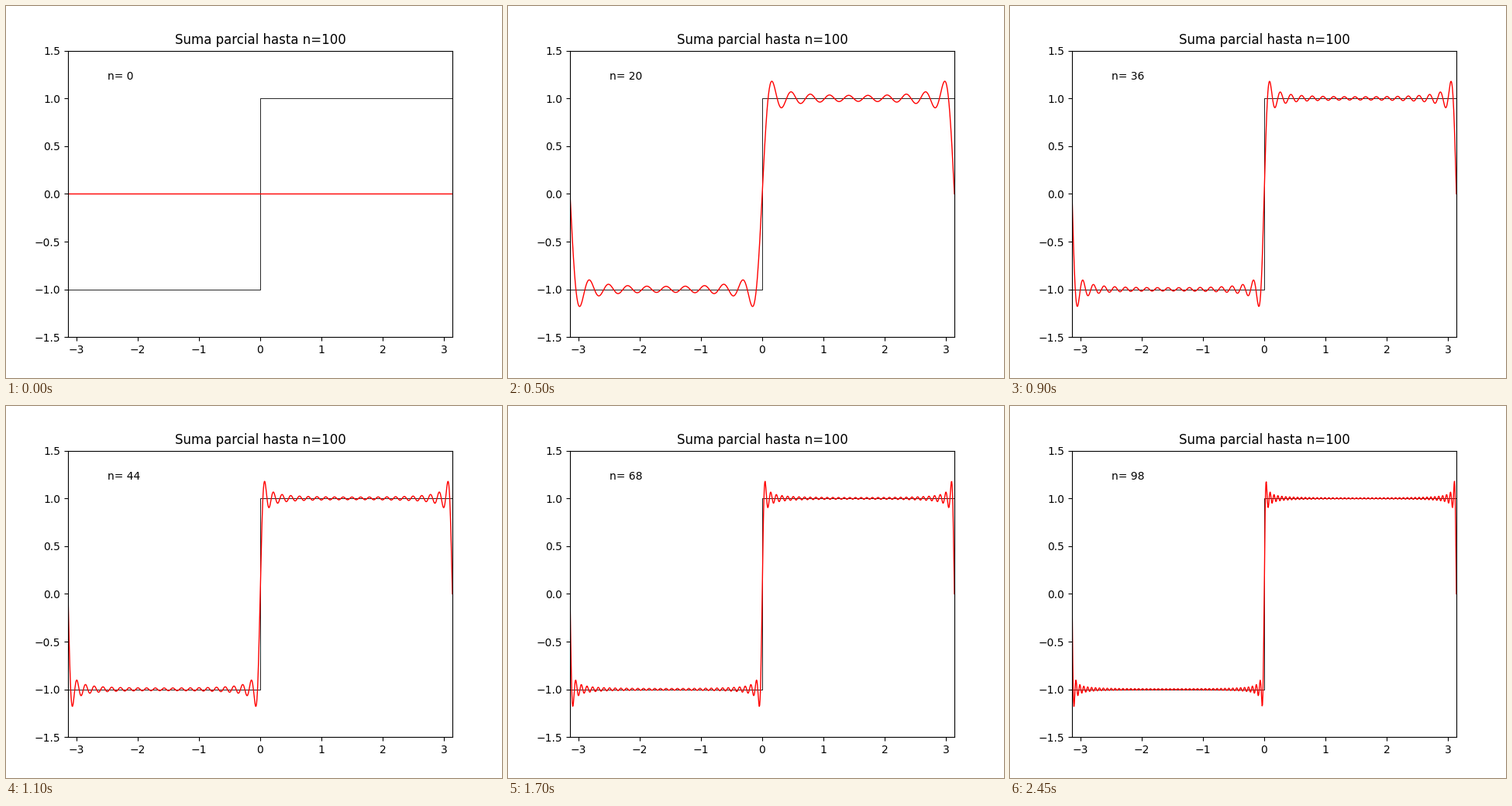
Write a matplotlib script that moves like this. It is 640 px wide and 480 px high and loops after 2500 ms.

```python
import numpy as np
import matplotlib.pyplot as plt
from matplotlib.animation import FuncAnimation

FRAMES, INTERVAL = 50, 50

fig, ax = plt.subplots(figsize=(6.4, 4.8), dpi=100)
ax.set_xlim(-np.pi, np.pi)
ax.set_ylim(-1.5, 1.5)
ax.set_title("Suma parcial hasta n=100")

x = np.linspace(-np.pi, np.pi, 1000)
ax.plot([-np.pi, 0, 0, np.pi], [-1, -1, 1, 1], color="black", lw=0.6)
curve, = ax.plot(x, 0 * x, color="red", lw=1)
label = ax.text(-2.5, 1.2, "n= 0")


def partial_sum(n):
    """Fourier series of the square wave, odd harmonics up to n."""
    k = np.arange(1, n + 1, 2)[:, None]
    return (4 / np.pi * np.sin(k * x) / k).sum(axis=0)


def update(i):
    n = 2 * i
    curve.set_ydata(partial_sum(n))
    label.set_text(f"n= {n}")
    return curve, label


anim = FuncAnimation(fig, update, frames=FRAMES, interval=INTERVAL,
                     repeat=True, repeat_delay=0)
plt.show()
```
